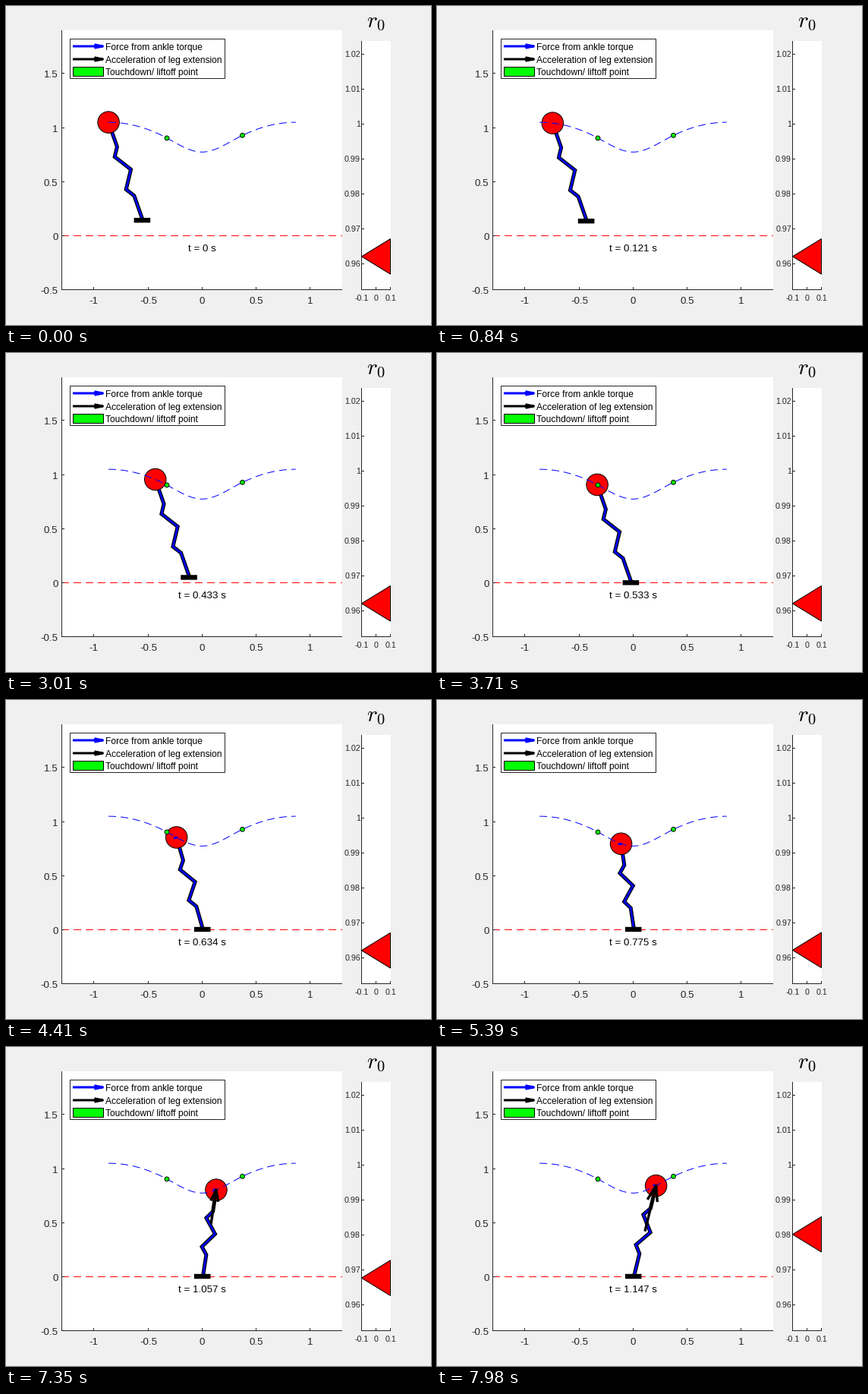
A matplotlib script that plays this animation: 560 px wide and 420 px high, repeating every 8000 ms.

```python
import numpy as np
import matplotlib.pyplot as plt
from matplotlib.animation import FuncAnimation
from matplotlib.patches import Circle, Polygon, Rectangle

plt.rcParams.update({"font.family": "Liberation Sans", "mathtext.fontset": "cm"})

W, H, DPI = 560, 420, 80
PT = 72 / DPI                  # points per pixel
UNIT = 142.5                   # pixels per world unit
OX, OY = 258.4, 302.7          # world origin on the stage
INK = "#262626"
TICK_MS, INTERVAL, LOOP = 70, 20, 8000
DT = 0.010064                  # simulated seconds per tick

T_DOWN, T_UP = 0.54, 1.315     # touchdown and liftoff times
START = np.array([135.1, 153.1])
END_X = 381.8
DOWN = (212.0, 173.9)
UP = (311.5, 170.3)
FOOT = np.array([258.7, 302.0])
FOOT_OFFSET = np.array([44.3, 129.0])

fig = plt.figure(figsize=(W / DPI, H / DPI), dpi=DPI, facecolor="#f0f0f0")
ax = fig.add_axes([0, 0, 1, 1])
ax.set_xlim(0, W)
ax.set_ylim(H, 0)
ax.axis("off")


def line(xs, ys, color=INK, width=1.0, z=2, **kw):
    kw.setdefault("solid_capstyle", "butt")
    art, = ax.plot(xs, ys, color=color, lw=width * PT, zorder=z, snap=False, **kw)
    return art


def rect(x0, y0, x1, y1, face, edge="none", z=1):
    return ax.add_patch(Rectangle((x0, y0), x1 - x0, y1 - y0, fc=face, ec=edge,
                                  lw=PT, zorder=z, snap=False))


def label(x, y, s, size, color=INK, ha="center", z=9):
    return ax.text(x, y, s, fontsize=size * PT, color=color, ha=ha,
                   va="baseline", zorder=z)


def arrow_points(tip, vec, head=0.33, spread=0.33):
    """Shaft and open head as one polyline with a break."""
    tip, vec = np.asarray(tip, float), np.asarray(vec, float)
    side = spread * np.array([-vec[1], vec[0]])
    gap = np.array([np.nan, np.nan])
    return np.array([tip - vec, tip, gap, tip - head * (vec + side), tip,
                     tip - head * (vec - side)]).T


def hermite(x, knots):
    """Piecewise cubic through (position, value, slope) knots."""
    k = np.array(knots)
    i = np.clip(np.searchsorted(k[:, 0], x) - 1, 0, len(k) - 2)
    (x0, y0, m0), (x1, y1, m1) = k[i], k[i + 1]
    h = x1 - x0
    s = (x - x0) / h
    rise = s * s * (3 - 2 * s)
    return (y0 + (y1 - y0) * rise
            + h * s * (1 - s) * (m0 * (1 - s) - m1 * s))


def stance_y(x):
    return hermite(x, [(*DOWN, 0.54), (258.3, 192.3, 0), (*UP, -0.49)])


def path_y(x):
    if x < DOWN[0]:
        return START[1] + (x - START[0]) ** 2 / (2 * UNIT)
    if x > UP[0]:
        return START[1] + (END_X - x) ** 2 / (2 * UNIT)
    return stance_y(x)


def ball_at(t):
    if t < T_DOWN:
        x = START[0] + UNIT * t
    else:
        x = hermite(t, [(T_DOWN, DOWN[0], 140), (0.9, 257.7, 120),
                        (T_UP, UP[0], 142)])
    return np.array([x, path_y(x)])


def rest_length(t):
    slow = max(t - T_DOWN, 0) / 0.416
    fast = max(t - 0.95, 0)
    return 0.962 + 0.00033 * slow ** 2 + 0.446 * fast ** 2


def gauge_y(r):
    return 155 + (1 - r) * 4600


def leg_points(hip, foot):
    along = foot - hip
    side = np.array([along[1], -along[0]]) / np.hypot(*along)
    frac = np.array([0, 0.25, 1 / 3, 0.5, 2 / 3, 0.75, 1])
    bend = 7.3 * np.array([0, 0, -1, 1, -1, 0, 0])
    return (hip + np.outer(frac, along) + np.outer(bend, side)).T


# main plot
rect(73, 32, 443, 374, "white")
line([73.5, 73.5], [32, 374], z=3)
line([73, 443], [373.5, 373.5], z=3)
for v in (-1, -0.5, 0, 0.5, 1):
    x = np.floor(OX + v * UNIT) + 0.5
    line([x, x], [370, 374], z=3)
    label(x, 392, f"{v:g}", 13.33)
for v in (-0.5, 0, 0.5, 1, 1.5):
    y = min(np.floor(OY - v * UNIT) + 0.5, 373.5)
    line([73, 77], [y, y], z=3)
    label(68.5, y + 5.5, f"{v:g}", 13.33, ha="right")

line([73, 443], [302.5, 302.5], "red", z=2, linestyle=(0, (10, 6)))
curve_x = np.linspace(START[0], END_X, 250)
line(curve_x, [path_y(x) for x in curve_x], "blue", z=6, linestyle=(0, (10, 6)))
for spot in (DOWN, UP):
    ax.add_patch(Circle(spot, 2.9, fc="lime", ec="black", lw=PT, zorder=7))

# legend
rect(84.5, 43.5, 288.5, 95.5, "white", INK, z=8)
for y, color, name in ((53, "blue", "Force from ankle torque"),
                       (70, "black", "Acceleration of leg extension")):
    line(*arrow_points((127.5, y), (39.5, 0), 0.28, 0.2), color, 3, z=9,
         solid_joinstyle="round")
    label(131, y + 5, name, 12, "black", "left")
rect(88.5, 80.5, 128.5, 92.5, "lime", "black", z=9)
label(131, 91, "Touchdown/ liftoff point", 12, "black", "left")

# gauge
rect(468, 46, 507, 374, "white")
line([468.5, 468.5], [46, 374], z=3)
line([468, 507], [373.5, 373.5], z=3)
for x, s in ((468.5, "-0.1"), (487.5, "0"), (506.5, "0.1")):
    line([x, x], [370, 374], z=3)
    label(x, 388, s, 10.67)
for i in range(7):
    v = 0.96 + 0.01 * i
    y = np.floor(gauge_y(v) + 0.1) + 0.5
    line([468, 472], [y, y], z=3)
    label(467, y + 3.5, f"{v:g}", 10.67, ha="right")
label(487, 28, "$r_0$", 29.3, "black")

# moving parts
leg_edge = line([], [], "black", 5, z=3.5, solid_joinstyle="miter")
leg_core = line([], [], "blue", 2.6, z=3.6, solid_joinstyle="miter")
sole = rect(0, 0, 21.6, 6.4, "black", z=4)
ball = ax.add_patch(Circle(START, 14.25, fc="red", ec="black", lw=PT, zorder=5))
torque = line([], [], "blue", 2.6, z=7.2, solid_joinstyle="round")
push = line([], [], "black", 3.4, z=7.3, solid_joinstyle="round")
pointer = ax.add_patch(Polygon([(0, 0), (1, 0), (1, 1)], closed=True, fc="red",
                               ec="black", lw=PT, zorder=4, snap=False))
clock = label(258.8, 323, "", 13.33, "black")


def update(frame):
    tick = (frame * INTERVAL + INTERVAL // 2) // TICK_MS
    t = tick * DT
    hip = ball_at(t)
    stance = t >= T_DOWN
    foot = FOOT if stance else hip + FOOT_OFFSET

    ball.center = hip
    sole.set_xy(foot - (10.8, 3.2))
    ankle = foot + (0.8, 0)
    pts = leg_points(hip, ankle)
    leg_edge.set_data(*pts)
    leg_core.set_data(*pts)

    up = (hip - ankle) / np.hypot(*(hip - ankle))
    torque.set_data(*arrow_points(hip, 4 * np.array([-up[1], up[0]])))
    torque.set_visible(stance)
    reach = 178 * (t - 0.8)
    push.set_data(*arrow_points(hip, reach * up))
    push.set_visible(reach > 0)

    y = gauge_y(rest_length(t))
    pointer.set_xy([(468.5, y), (506.5, y - 23.3), (506.5, y + 23.3)])
    clock.set_text(f"t = {round(t, 3):g} s")
    return leg_edge, leg_core, sole, ball, torque, push, pointer, clock


anim = FuncAnimation(fig, update, frames=LOOP // INTERVAL, interval=INTERVAL,
                     init_func=lambda: update(0), repeat=True, repeat_delay=0,
                     blit=False)
plt.show()
```
